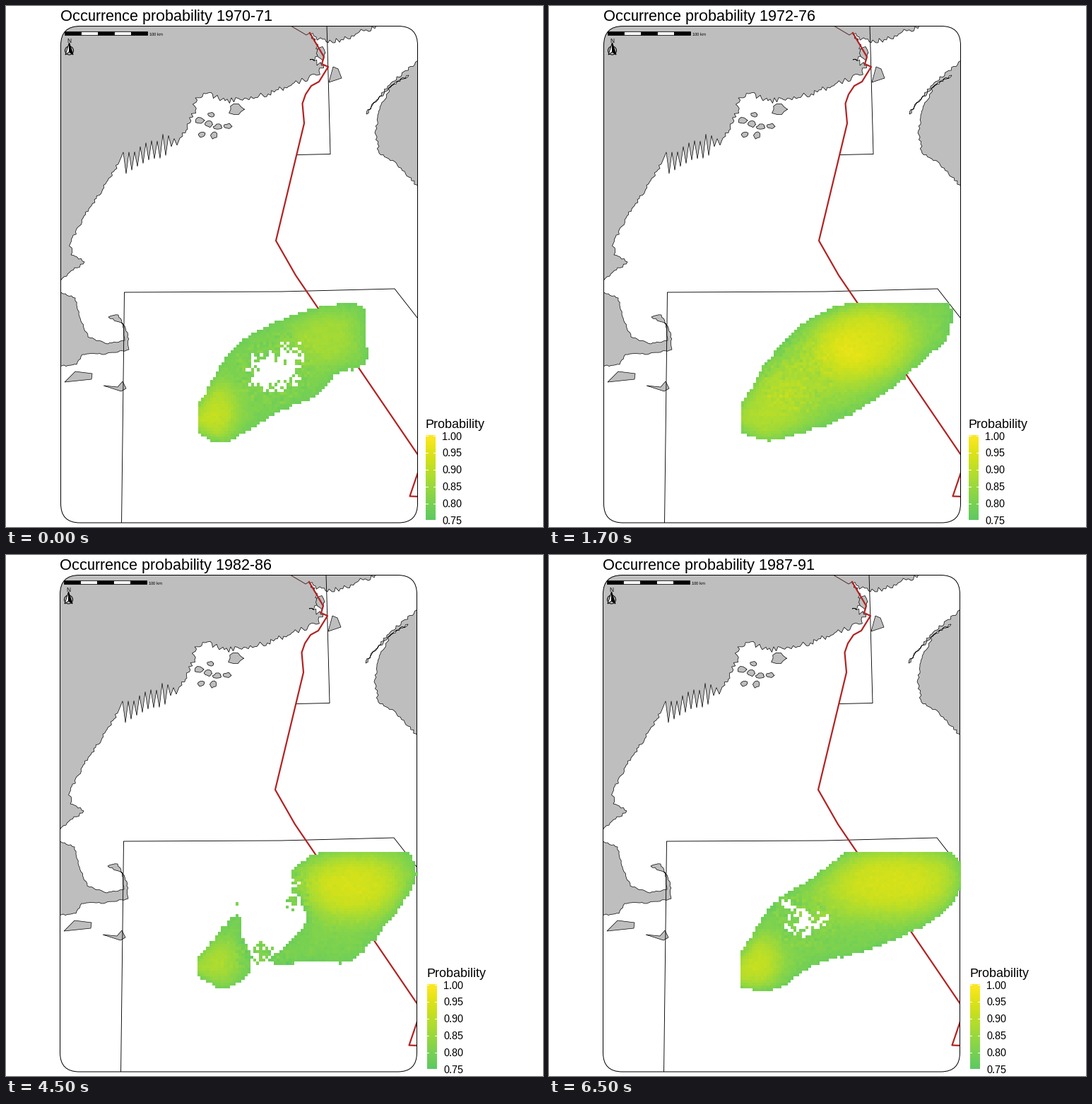
A matplotlib script that plays this animation: 760 by 737 pixels, repeating every 8000 ms.

```python
import numpy as np
import matplotlib.pyplot as plt
from matplotlib.animation import FuncAnimation
from matplotlib.patches import Circle, FancyBboxPatch, Polygon, Rectangle
from matplotlib.path import Path
from matplotlib.transforms import Affine2D

W, H, DPI = 760, 737, 64
PT = 72 / DPI  # points per pixel
COLS, ROWS, CELL = 75, 50, (4.16, 4.2)
TOP = 420
GREY, RED = "#bebebe", "#b22222"

plt.rcParams.update({"font.family": "Liberation Sans", "text.hinting": "native",
                     "text.hinting_factor": 1})
fig = plt.figure(figsize=(W / DPI, H / DPI), dpi=DPI, facecolor="white")
ax = fig.add_axes([0, 0, 1, 1])
ax.axis("off")
rng = np.random.default_rng(7)

map_shift, legend_shift = Affine2D(), Affine2D()
on_map = map_shift + ax.transData
on_legend = legend_shift + ax.transData


def frame_box(**style):
    return ax.add_patch(FancyBboxPatch(
        (77.5, 28.5), 505, 702.5, transform=on_map,
        boxstyle="round,pad=0,rounding_size=27", **style))


clip = frame_box(fc="white", ec="none", zorder=0)
frame_box(fc="none", ec="black", lw=PT, zorder=3.5)


def roughen(points, amount):
    """Break every segment into short jagged steps."""
    out = []
    for a, b in zip(np.array(points[:-1], float), np.array(points[1:], float)):
        length = np.hypot(*(b - a))
        normal = np.array([a[1] - b[1], b[0] - a[0]]) / length
        steps = max(1, int(length / 3))
        for k in range(steps):
            offset = rng.uniform(-amount, amount) if k else 0
            out.append(a + (b - a) * k / steps + normal * offset)
    return out + [points[-1]]


def land(shape):
    ax.add_patch(Polygon(shape, fc=GREY, ec="black", lw=0.7 * PT, zorder=1,
                         transform=on_map, clip_path=clip))


def island(cx, cy, rx, ry):
    turn = np.linspace(0, 2 * np.pi, 11)
    radius = rng.uniform(0.7, 1.2, turn.size)
    land(np.column_stack([cx + rx * radius * np.cos(turn), cy + ry * radius * np.sin(turn)]))


def route(points, color="black", width=0.9, z=2):
    line, = ax.plot(*zip(*points), color=color, lw=width * PT, zorder=z, transform=on_map)
    line.set_clip_path(clip)


def text(x, y, string, size, transform=ax.transData):
    return ax.text(x, y, string, fontsize=size * PT, transform=transform,
                   va="baseline", zorder=8)


# Mainland: indented north shore, a row of narrow inlets, then the smoother west shore
north = [(524, 28), (489, 42), (456, 52), (430, 40), (447, 70), (430, 76), (450, 84),
         (440, 98), (394, 115), (350, 131), (310, 134), (286, 123), (268, 130),
         (268, 148), (257, 174), (250, 184)]
inlets = [(246 - 4 * k, 188 + 1.7 * k + (k % 2 or -1) * min(13, 2 + 2 * k) + rng.uniform(-4, 4))
          for k in range(21)]
west = [(160, 221), (148, 242), (128, 272), (109, 300), (91, 336), (92, 352),
        (111, 362), (80, 385), (60, 392)]
land(roughen(north, 4) + inlets + roughen(west, 2) + [(60, 10), (524, 10)])

land(roughen([(70, 402), (98, 413), (103, 436), (116, 468), (144, 478), (168, 473),
              (166, 450), (145, 440), (159, 437), (172, 462), (174, 486), (142, 492),
              (108, 493), (100, 507), (70, 510)], 1.2))
land(roughen([(590, 73), (547, 107), (520, 137), (510, 153), (526, 133), (551, 108),
              (570, 98), (544, 114), (529, 146), (523, 176), (528, 208), (550, 220),
              (570, 242), (590, 262)], 1.8))
land([(457, 108), (463, 86), (470, 89), (475, 102), (457, 108)])
land([(83, 532), (98, 517), (122, 520), (121, 528), (83, 532)])
land([(138, 537), (158, 539), (165, 531), (170, 541), (163, 545), (138, 537)])
island(326, 146, 11, 8)
island(446, 67, 6, 9)
for cx, cy in [(274, 162), (287, 167), (277, 182), (294, 183), (300, 171), (314, 170), (290, 154)]:
    island(cx, cy, rng.uniform(4, 7), rng.uniform(3, 5))

# Boundaries and the red route
route([(163.5, 735), (167.5, 405), (390, 404), (550, 400), (586, 446)])
route([(454, 28), (455, 60), (459, 209.5), (412, 210.5)])
route([(403, 28), (425, 41), (430, 38)], "#4a2020")
route([(430, 38), (450, 72), (447, 82), (456, 86), (443, 107), (432, 113), (424, 125),
       (419.5, 138), (422, 166), (382, 332), (410, 381), (583, 635)], RED, 2.2, 3)
route([(586, 651), (571.5, 693.5), (586, 694)], RED, 2.2, 3)

# Scale bar and north arrow
for k in range(5):
    ax.add_patch(Rectangle((83 + 23.4 * k, 35.5), 23.4, 5.5, ec="black", lw=0.8 * PT,
                           fc="white" if k % 2 else "black", transform=on_map, zorder=7))
text(203, 41.5, "100 km", 6, on_map)
text(86, 52, "N", 8, on_map)
ax.add_patch(Circle((89.5, 63), 6, fc="none", ec="black", lw=PT, transform=on_map, zorder=7))
for side, fill in ((-1, "white"), (1, "black")):
    ax.add_patch(Polygon([(89.5, 52), (89.5 + 5.5 * side, 69), (89.5, 65)], fc=fill,
                         ec="black", lw=PT, transform=on_map, zorder=7))

# Legend
ax.imshow(np.linspace(1, 0.75, 120)[:, None], cmap="viridis", vmin=0, vmax=1, aspect="auto",
          extent=(594, 608, 727.5, 607.5), transform=on_legend, zorder=7)
text(594, 597, "Probability", 18.33, on_legend)
for k in range(6):
    y = 608 + 23.9 * k
    text(617.5, y + 5.5, f"{1 - 0.05 * k:.2f}", 14.67, on_legend)
    for x in (594, 605.2):
        ax.plot([x, x + 2.8], [y, y], color="white", lw=PT, transform=on_legend, zorder=8)


def smooth(points):
    """Closed Catmull-Rom curve through the points."""
    p = np.array(points, float)
    a, b, c, d = (np.roll(p, k, axis=0)[:, None] for k in (1, 0, -1, -2))
    t = np.linspace(0, 1, 12, endpoint=False)[None, :, None]
    curve = 2 * b + (c - a) * t + (2*a - 5*b + 4*c - d) * t**2 + (3*b - a - 3*c + d) * t**3
    return curve.reshape(-1, 2) / 2


def surface(left, outlines, peaks, holes=(), specks=(), seed=0):
    """Grid of probabilities; outlines may run past the grid and are cut there."""
    noise = np.random.default_rng(seed)
    x, y = np.meshgrid(left + CELL[0] * (np.arange(COLS) + 0.5),
                       TOP + CELL[1] * (np.arange(ROWS) + 0.5))
    cells = np.stack([x, y], axis=-1)
    inside = np.zeros(x.shape, bool)
    edge = np.full(x.shape, np.inf)
    for outline in outlines:
        rim = smooth(outline)
        jittered = cells + noise.uniform(-1, 1, cells.shape)
        inside |= Path(rim).contains_points(jittered.reshape(-1, 2)).reshape(x.shape)
        gap = np.linalg.norm(cells[:, :, None] - rim, axis=-1).min(axis=-1)
        edge = np.minimum(edge, gap)

    def ring(cx, cy, rx, ry):
        return np.hypot((x - cx) / rx, (y - cy) / ry)

    value = 0.805 + sum(gain * np.exp(-ring(*peak) ** 3) for *peak, gain in peaks)
    value = 0.77 + (value - 0.77) * (1 - np.exp(-(edge + 2) / 9))
    value += noise.normal(0, 0.005, x.shape)
    for keep, spots in ((False, holes), (True, specks)):
        for *spot, core, reach in spots:
            distance = ring(*spot)
            inside[distance < noise.uniform(core, reach, x.shape)] = keep
            value += noise.normal(0, 0.011, x.shape) * (distance < 1.5)
    return left, np.where(inside, np.clip(value, 0.75, 1), np.nan)


# Peaks are (x, y, rx, ry, gain); holes and specks are (x, y, rx, ry, core, reach)
first = surface(
    272,
    [[(240, 590), (272, 563), (318, 488), (375, 450), (440, 427), (504, 424), (508, 465),
      (509, 506), (470, 520), (440, 550), (378, 578), (310, 618), (272, 604)]],
    [(288, 575, 40, 48, .11), (453, 468, 50, 42, .06)],
    holes=[(378, 518, 40, 30, .4, 1.15), (402, 494, 26, 22, 0, 1.1)], seed=11)

second = surface(
    272,
    [[(240, 590), (272, 563), (318, 490), (375, 440), (437, 417), (500, 412), (562, 415),
      (566, 466), (530, 500), (490, 537), (425, 579), (360, 603), (305, 615), (272, 602)]],
    [(448, 472, 72, 58, .13), (305, 570, 65, 60, .08), (385, 515, 70, 55, .05)],
    specks=[(350, 520, 34, 38, 0, .1)], seed=12)

third = surface(
    271,
    [[(240, 590), (272, 566), (313, 497), (366, 465), (425, 425), (500, 414), (563, 415),
      (586, 455), (550, 510), (510, 552), (460, 591), (380, 606), (310, 625), (271, 610)]],
    [(490, 468, 88, 48, .13), (290, 580, 48, 45, .11)],
    holes=[(370, 508, 39, 36, .7, 1.1), (398, 505, 20, 28, 0, 1)], seed=13)

fourth = surface(
    271,
    [[(403, 450), (440, 422), (500, 413), (560, 414), (580, 455), (545, 515), (490, 573),
      (440, 574), (376, 576), (422, 525), (418, 490)],
     [(240, 592), (271, 570), (326, 508), (334, 540), (342, 556), (345, 590), (310, 614),
      (271, 596)]],
    [(490, 467, 78, 50, .13), (285, 575, 45, 40, .08)],
    holes=[(408, 482, 14, 26, 0, .9)],
    specks=[(408, 485, 18, 32, 0, .7), (364, 563, 28, 18, 0, .9), (327, 493.5, 2, 2, 1, 1)],
    seed=14)

fifth = surface(
    271,
    [[(240, 590), (272, 563), (313, 498), (370, 458), (430, 417), (500, 412), (563, 415),
      (586, 455), (560, 505), (500, 540), (440, 563), (380, 578), (320, 614), (272, 613)]],
    [(490, 462, 95, 52, .13), (288, 577, 42, 45, .11), (400, 490, 50, 40, .02)],
    holes=[(364, 519, 32, 25, .1, 1.05), (340, 497, 20, 12, 0, 1)], seed=15)

SCENES = [("1970-71", first), ("1972-76", second), ("1977-81", third),
          ("1982-86", fourth), ("1987-91", fifth)]

heat = ax.imshow(first[1], cmap="viridis", vmin=0, vmax=1, aspect="auto",
                 interpolation="nearest", zorder=4)
title = text(77, 21, "", 22)
ax.set(xlim=(0, W), ylim=(H, 0))


def update(frame):
    index = (frame + 3) // 4  # half-second frames; the first scene is cut short
    years, (left, grid) = SCENES[index]
    wide = index >= 2
    map_shift.clear().translate(-wide, 0)
    legend_shift.clear().translate(1.5 * wide, 0)
    title.set_text(f"Occurrence probability {years}")
    title.set_x(77 - 1.5 * wide)
    heat.set_data(grid)
    heat.set_extent((left, left + COLS * CELL[0], TOP + ROWS * CELL[1], TOP))
    ax.set(xlim=(0, W), ylim=(H, 0))
    return heat, title


animation = FuncAnimation(fig, update, frames=16, interval=500, repeat=True, repeat_delay=0)
plt.show()
```
